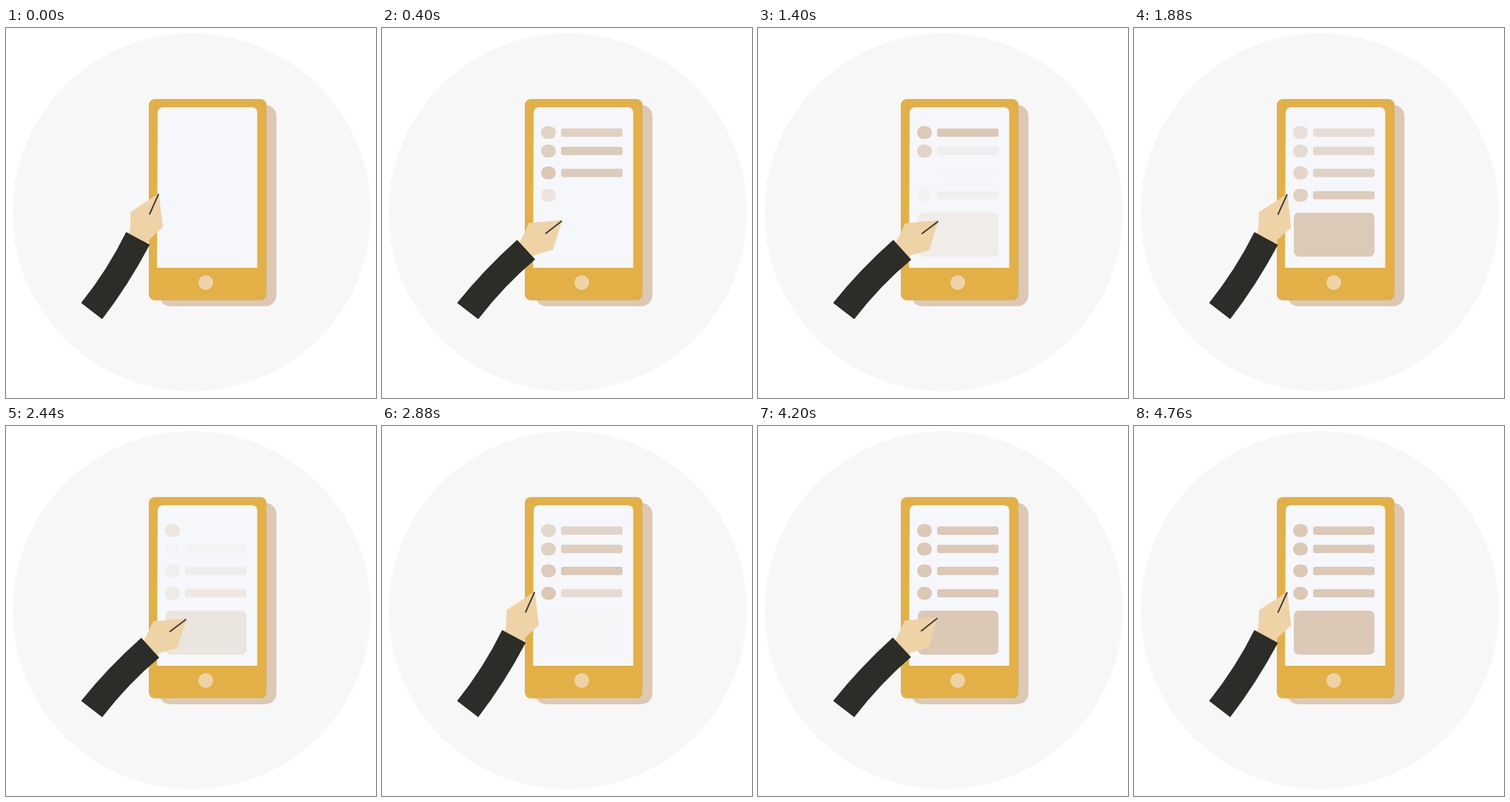
These frames come from a looping animation (500 by 500 pixels, 4800 ms). An HTML page:

```html
<!DOCTYPE html>
<html lang="en">
<head>
<meta charset="utf-8">
<title>Filling in a form</title>
<style>
  html, body { margin: 0; height: 100%; overflow: hidden; background: #fff; }
  svg { display: block; width: 100vw; height: 100vh; }
</style>
</head>
<body>
<svg viewBox="0 0 500 500">
  <circle cx="251" cy="249" r="242" fill="#f7f7f7"/>
  <rect x="207" y="104" width="158.5" height="272" rx="15" fill="#dbc9b6"/>
  <rect x="193" y="96" width="159" height="272" rx="8" fill="#e2b047"/>
  <path d="M204 324L205 115Q205 107 213 107H331.500Q339.500 107 339.500 115V324Z" fill="#f5f7fa"/>
  <circle cx="270" cy="344" r="10" fill="#eed3a7"/>
  <g id="form" fill="#dbc9b6"></g>
  <path id="hand" fill="#eed3a7"/>
  <path id="pen" fill="none" stroke="#3d3a33" stroke-width="1.9"/>
  <path id="sleeve" fill="#2c2c28"/>
</svg>
<script>
const LOOP = 4800, CYCLE = 1200, STAGGER = 59.5, SWING = 480;
const form = document.getElementById('form');
const fields = [];

function addField(x, y, width, height, rx) {
  const rect = document.createElementNS('http://www.w3.org/2000/svg', 'rect');
  for (const [name, value] of Object.entries({ x, y, width, height, rx })) rect.setAttribute(name, value);
  form.append(rect);
  fields.push(rect);
}
for (const y of [141.3, 166.2, 195.8, 226]) {
  addField(215, y - 8.75, 20, 17.5, 8.75);
  addField(242, y - 5.6, 83, 11.2, 3);
}
addField(216, 249.5, 109, 59.5, 7);

// Quick fade in, slow fade out; the last cycle stays visible.
function fieldOpacity(time, index) {
  const age = time - index * STAGGER;
  if (age < 0) return 0;
  const cycle = Math.min(3, Math.floor(age / CYCLE));
  const t = age - cycle * CYCLE;
  const rise = Math.min(1, t / 110);
  return cycle === 3 ? rise : Math.max(0, Math.min(rise, (1160 - t) / 980));
}

// cubic-bezier(.4, 0, .2, 1)
function ease(x) {
  let lo = 0, hi = 1;
  for (let i = 0; i < 24; i++) {
    const t = (lo + hi) / 2, s = 1 - t;
    if (1.2 * s * s * t + 0.6 * s * t * t + t ** 3 < x) lo = t; else hi = t;
  }
  return lo * lo * (3 - 2 * lo);
}

// Moves a point from left pose to right pose along a shallow arc.
function swing([x0, y0, x1, y1], s) {
  const dx = x1 - x0, dy = y1 - y0, bulge = 0.22 * s * (1 - s);
  return `${(x0 + dx * s + dy * bulge).toFixed(2)} ${(y0 + dy * s - dx * bulge).toFixed(2)}`;
}

const handPoints = [
  [206.5, 223.5, 242.8, 258.5], [168.5, 248.5, 198, 263], [167.7, 272, 190, 281],
  [164.5, 281, 184, 292], [189, 296, 202, 312], [194, 285.5, 207, 306], [212, 269, 231, 299]
];
const penPoints = [[193.8, 252, 220.3, 277.2], [206.2, 224.3, 242.4, 259.8]];
const cuffLeft = [162.3, 275.7, 182.2, 285.8], cuffRight = [194.2, 292.8, 206.8, 312.2];

function setPath(id, d) { document.getElementById(id).setAttribute('d', d); }

function render(time) {
  fields.forEach((field, i) => field.setAttribute('opacity', fieldOpacity(time, i)));
  const u = 1 - Math.abs(time % (2 * SWING) / SWING - 1);
  const s = 1.04 * ease(u);
  const line = points => 'M' + points.map(p => swing(p, s)).join('L');
  setPath('hand', line(handPoints) + 'Z');
  setPath('pen', line(penPoints));
  setPath('sleeve', `M101.500 371.500Q137.500 326.500 ${swing(cuffLeft, s)}` +
    `L${swing(cuffRight, s)}Q165.500 347.500 130 393.500Z`);
}

const start = performance.now();
function tick() {
  render((performance.now() - start) % LOOP);
  requestAnimationFrame(tick);
}
tick();
</script>
</body>
</html>
```
